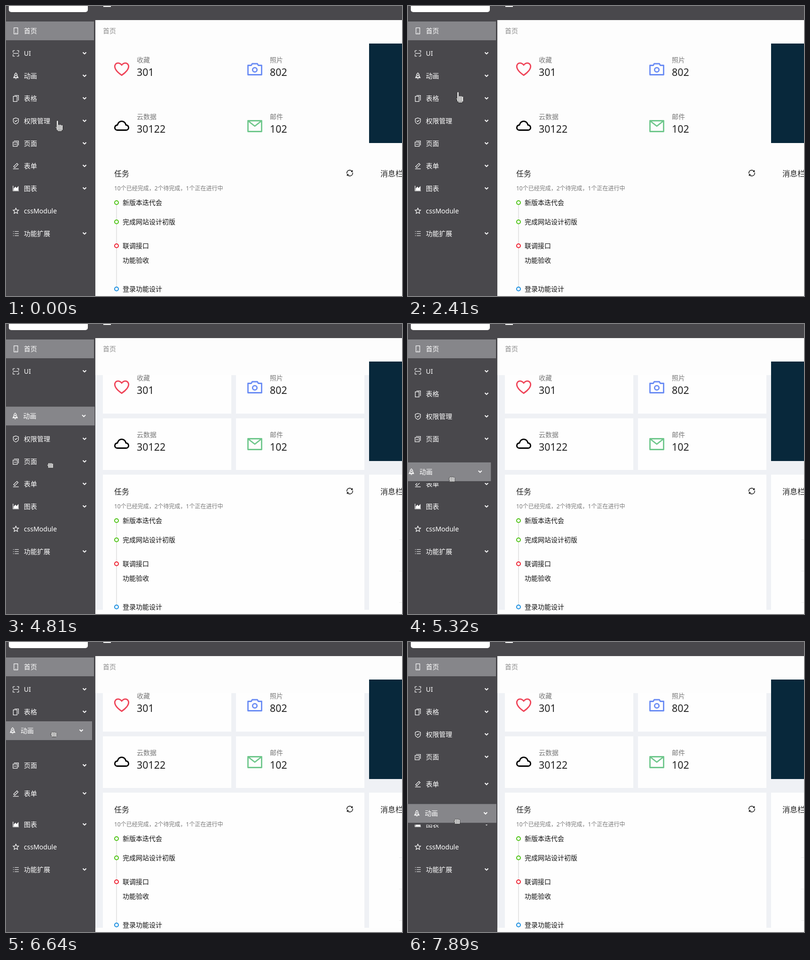
Recreate the animation shown at these times as an HTML page. Size 842 by 618 pixels, loop 8000 ms.

```html
<!DOCTYPE html>
<html lang="zh-CN">
<head>
<meta charset="utf-8">
<style>
html, body { margin: 0; width: 100%; height: 100%; overflow: hidden; background: #fdfdfd; }
svg { display: block; font: 14px "Noto Sans", "Noto Sans CJK SC", sans-serif; }
.icon { fill: none; stroke: #fff; stroke-width: 1.2; }
.big { fill: none; stroke-width: 2.8; stroke-linejoin: round; }
.row text { font-weight: 500; }
.note { font-family: "Noto Sans", "Noto Sans CJK TC", sans-serif; }
.hand { fill: #fff; stroke: #222; }
</style>
</head>
<body>
<svg id="stage" width="842" height="618" viewBox="0 0 842 618"></svg>
<script>
const DARK = '#49484c', LIT = '#86868a', LOOP = 8000;
const LIFT = 4100, LAG = 100, DRAGGED = 2;

const rect = (x, y, w, h, fill, more = '') =>
  `<rect x="${x}" y="${y}" width="${w}" height="${h}" fill="${fill}" ${more}/>`;
const box = (w, h, more = '') => rect(-w / 2, -h / 2, w, h, 'none', more);
const text = (x, y, s, fill = '#111', size = 14) =>
  `<text x="${x}" y="${y}" fill="${fill}" font-size="${size}">${s}</text>`;
const path = (d, more = '') => `<path d="${d}" ${more}/>`;
const circle = (x, y, r, more = '') => `<circle cx="${x}" cy="${y}" r="${r}" ${more}/>`;
const at = (x, y, body, more = '') => `<g transform="translate(${x} ${y})" ${more}>${body}</g>`;
const list = (n, f) => Array.from({ length: n }, (_, i) => f(i)).join('');

const star = 'M' + Array.from({ length: 10 }, (_, i) => {
  const a = i * Math.PI / 5, r = i % 2 ? 3 : 6.3;
  return [r * Math.sin(a), -r * Math.cos(a)].map(v => v.toFixed(2));
}).join('L') + 'Z';

// Menu icons are drawn around (0, 0) in a 14 px box.
const menu = [
  ['首页', box(8, 13) + path('M-1 4.500H1')],
  ['UI', box(12, 12, 'stroke-dasharray="4 4 8 4 4 0"') + path('M-6 0H6')],
  ['动画', path('M-3 3V-1Q-3-4 0-6.500Q3-4 3-1V3ZM-3 0L-5 4H5L3 0M-1.500 6H1.500') + circle(0, -1, 1)],
  ['表格', at(-1.5, 1, box(8, 11)) + path('M-3-6.500H5.500V4.500')],
  ['权限管理', path('M0-6.500L5.500-4.500V1Q5 4.500 0 6.500Q-5 4.500-5.500 1V-4.500ZM-2.500-.5L-.5 1.500L3-2')],
  ['页面', at(-1.5, 1.5, box(9, 9) + path('M-2.500 0H2.500')) + path('M-4-5.500H5.500V4')],
  ['表单', at(0, -1, box(10, 3.5, 'transform="rotate(-45)"')) + path('M-6 6H6')],
  ['图表', path('M-6-6V5H6.500') + path('M-4 4V0L-1-3L1.500 0L5-4V4Z', 'fill="#fff"')],
  ['cssModule', path(star)],
  ['功能扩展', list(3, i => path(`M-6 ${4.5 * i - 4.5}h1.500m2 0h8.500`))]
];
const rowY = i => 53 + 48 * i;

function menuItem([label, icon], i) {
  const chevron = label === '首页' || label === 'cssModule' ? ''
    : path('M163.500-2.300l3.500 3.500l3.500-3.500', 'fill="none" stroke="#fff" stroke-width="2"');
  const back = i === DRAGGED
    ? `<g id="lift">${rect(-10, -24, 200, 48, DARK)}${rect(-10, -20, 200, 40, LIT)}</g>` : '';
  return at(0, rowY(i), back + at(21, 0, icon, 'class="icon"') + text(38, 5, label, '#fff') + chevron,
    `id="item${i}" class="row"`);
}

const stats = [
  ['收藏', '301', '#ef4458', path('M0 12.500C-28-6-9-21 0-9C9-21 28-6 0 12.500Z')],
  ['照片', '802', '#6a8cf4', path('M-14.500-8.500h7l2-3.500h11l2 3.500h7v20h-29Z') + circle(0, 1, 4.7)],
  ['云数据', '30122', '#000', path('M-9 8.500C-16 8.500-17-1-9-2.500C-6-13 6-13 9-2.500C17-1 16 8.500 9 8.500Z')],
  ['邮件', '102', '#6fc78c', box(29, 23) + path('M-14-11L0 0L14-11')]
].map(([label, value, color, icon], i) =>
  at(246 + 283 * (i % 2), 135 + 121 * (i >> 1),
    `<g class="big" stroke="${color}">${icon}</g>` +
    text(32, -15, label, '#777') + text(32, 14, value, '#222', 21.4))).join('');

const tasks = [
  [419, '新版本迭代会', '#52c41a'], [460, '完成网站设计初版', '#52c41a'],
  [511, '联调接口', '#ee2433'], [542, '功能验收'], [603, '登录功能设计', '#1c8fe0']
].map(([y, label, color]) => text(248, y + 5, label) +
  (color ? circle(235, y, 4, `fill="#fff" stroke="${color}" stroke-width="2"`) : '')).join('');

const card = (x, y, w, h) => rect(x, y, w, h, '#fefefe');
const cards = rect(190, 109, 652, 500, '#eff1f5') +
  list(2, i => card(206 + 283 * i, 109, 273, 82) + card(206 + 283 * i, 201, 273, 110)) +
  card(206, 321, 556, 288) + card(772, 321, 70, 288) +
  list(3, i => rect(836, 459 + 67 * i, 6, 1, '#ececec'));

const halfTurn = path('M-6 1A6 6 0 0 1 4.500-4M5.500-6v3h-3');
const reload = `<g fill="none" stroke="#111" stroke-width="1.4">${halfTurn}<g transform="rotate(180)">${halfTurn}</g></g>`;

// Both hands are a palm with four rounded fingers; the pointer raises one.
const finger = (x, top, w) => rect(x, top, w, 8 - top, '#fff', 'rx="1.8" stroke-width=".7"');
const hand = (palm, raise, w) => `<g class="hand">${palm}` +
  list(4, i => finger(w * (i - 1.5) - .5, i ? Math.abs(i - 1.5) - 5 : raise, w)) + '</g>';
const pointer = at(0, 1, hand(path('M-5 2Q-9-2-8 1Q-5 7-2.500 10H5.500Q8 5 8 0Z'), -13, 3.2));
const fist = `<g transform="scale(.88)">${hand(path('M-6-1Q-9 0-5 5L-3 8H5L7 2Z'), -4.5, 3)}</g>`;

const $ = id => document.getElementById(id);
$('stage').innerHTML =
  rect(0, 0, 842, 618, '#fdfdfd') + `<g id="cards">${cards}</g>` +
  rect(0, 0, 842, 30, DARK) + rect(0, 0, 190, 618, DARK) +
  rect(6, -20, 168, 33, '#fff', 'rx="5"') + rect(207, 0, 16, 2, '#fff') +
  rect(0, 33, 187, 40, LIT) + text(206, 58, '首页', '#8c8c8c') +
  rect(772, 80, 70, 212, '#08283b') + stats +
  text(230, 363, '任务', '#222', 16) + text(796, 363, '消息栏', '#222', 16) +
  `<g class="note">${text(230, 393, '10个已经完成，2个待完成，1个正在进行中', '#777', 12)}</g>` +
  at(731, 356, reload) + rect(234, 424, 2, 175, '#e5e5e5') + tasks +
  menu.map((m, i) => i === DRAGGED ? '' : menuItem(m, i)).join('') +
  menuItem(menu[DRAGGED], DRAGGED) +
  `<g id="cursor"><g id="pointer">${pointer}</g><g id="fist">${fist}</g></g>`;

// Stops of the hand: [time, x, y].
const stops = [
  [120, 113, 256], [600, 92, 220], [1090, 100, 228], [1500, 100, 228], [1950, 110, 160],
  [2410, 110, 195], [2860, 110, 157], [3260, 107, 155], [3690, 103, 218], [4650, 111, 155],
  [4810, 94, 300], [5800, 92, 356], [5950, 92, 340], [6380, 100, 330], [6540, 100, 195],
  [7190, 120, 202], [7890, 104, 381]
];
const ease = p => p * p * (3 - 2 * p);

function handAt(t) {
  const n = stops.findIndex(s => s[0] > t);
  const b = stops.at(n), a = n > 0 ? stops[n - 1] : b;
  const p = a === b ? 0 : ease((t - a[0]) / (b[0] - a[0]));
  return [a[1] + (b[1] - a[1]) * p, a[2] + (b[2] - a[2]) * p];
}

// The lifted row trails the hand.
function dragAt(t) {
  if (t < LIFT) return [0, rowY(DRAGGED)];
  const [x, y] = handAt(t - LAG);
  return [x - 107, y - 6];
}

// A row slides over 240 ms after the lifted row passes its edge.
function slide(i, t) {
  const steps = 24;
  let passed = 0;
  for (let k = 0; k < steps; k++) {
    if (dragAt(t - k * 10)[1] > rowY(i) - 24) passed++;
  }
  return 48 * ease(passed / steps);
}

const move = (id, x, y) => $(id).setAttribute('transform', `translate(${x.toFixed(2)} ${y.toFixed(2)})`);
const show = (id, on) => $(id).setAttribute('visibility', on ? 'visible' : 'hidden');

function draw(t) {
  for (let i = DRAGGED + 1; i < menu.length; i++) move('item' + i, 0, rowY(i) - slide(i, t));
  move('item' + DRAGGED, ...dragAt(t));
  move('cursor', ...handAt(t));
  show('lift', t >= LIFT);
  show('cards', t >= 4420);
  show('pointer', t < 3260);
  show('fist', t >= 3260);
}

const start = performance.now();
function frame() {
  draw((performance.now() - start) % LOOP);
  requestAnimationFrame(frame);
}
frame();
</script>
</body>
</html>
```
